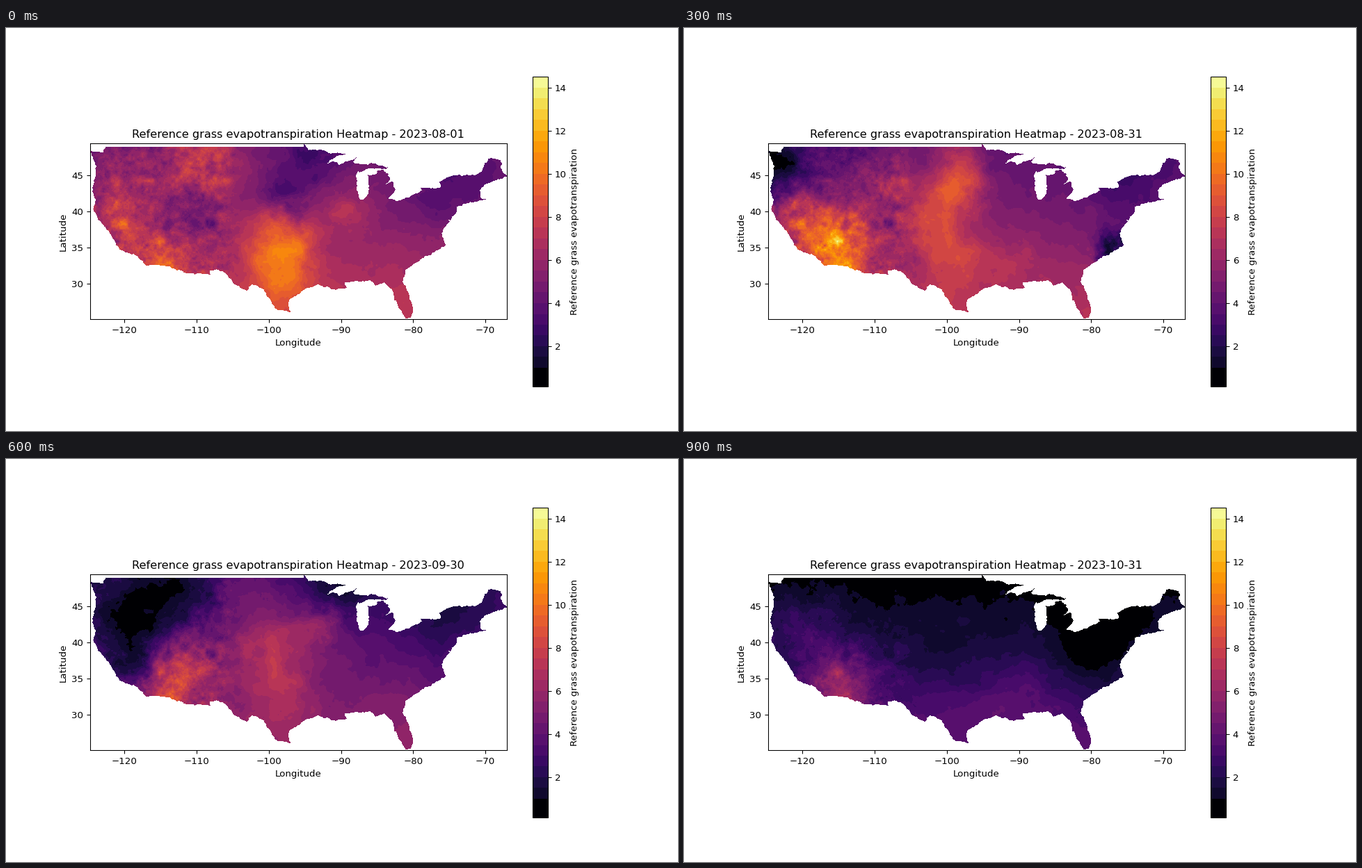
Write a matplotlib script that moves like this. It is 966 px wide and 580 px high and loops after 1 s.

```python
import matplotlib.pyplot as plt
import numpy as np
from matplotlib.animation import FuncAnimation
from matplotlib.colors import ListedColormap
from matplotlib.path import Path

WIDTH, HEIGHT, DPI = 966, 580, 96.6
WEST, EAST, SOUTH, NORTH = -124.7875, -67.0375, 25.046, 49.421
COLS, ROWS = 599, 253
VMIN, VMAX = 0.124, 14.517
STEPS = 10
LABEL = "Reference grass evapotranspiration"

lon, lat = np.meshgrid(np.linspace(WEST, EAST, COLS), np.linspace(NORTH, SOUTH, ROWS))

# Key points (lon, lat) of the outline, clockwise from the north-west corner.
NORTH_SHORE = [
    (-124.7, 48.4), (-123.0, 48.13), (-122.7, 49), (-95.15, 49), (-95.15, 49.4),
    (-94.64, 48.74), (-93, 48.6), (-91.4, 48.1), (-90.8, 48.2), (-89.2, 48),
    (-90.5, 47.7), (-92, 46.72), (-90.75, 46.95), (-90.4, 46.57), (-89, 46.98),
    (-87.8, 47.47), (-88.45, 46.8), (-87.4, 46.5), (-85.2, 46.75), (-83.55, 46.1),
    (-84.2, 45.63), (-83.4, 45.2), (-83.3, 44.3), (-83.9, 43.7), (-82.95, 44.07),
    (-82.45, 43), (-83.45, 41.72), (-82, 41.5), (-80.5, 41.98), (-78.9, 42.85),
    (-79.05, 43.27), (-76.9, 43.28), (-76.2, 43.55), (-76.3, 44.1), (-74.75, 45)]
EAST_COAST = [
    (-71.5, 45), (-70.4, 45.75), (-69.99, 46.7), (-69.23, 47.46), (-67.8, 47.07),
    (-67.78, 45.95), (-66.97, 44.85), (-70, 43.75), (-70.75, 42.9), (-70.5, 41.78),
    (-69.95, 41.7), (-72, 41.2), (-73.9, 40.57), (-74.1, 39.75), (-75.1, 38.6),
    (-75.95, 37), (-75.55, 35.25), (-77.95, 33.87), (-79.3, 33.1), (-81, 31.9),
    (-81.4, 30.3), (-80.1, 27), (-80.15, 25.75), (-80.4, 25.15)]
SOUTH_COAST = [
    (-81.1, 25.13), (-82.75, 27.9), (-82.65, 28.8), (-84.1, 30.1), (-85.2, 29.65),
    (-86, 30.3), (-89.5, 30.15), (-89.3, 29.3), (-90.9, 29.1), (-93.2, 29.77),
    (-94.8, 29.3), (-97.2, 27.7), (-97.15, 25.95), (-99.1, 26.4), (-100.7, 29.1),
    (-102.3, 29.88), (-103.15, 28.98), (-104.5, 29.65), (-106.5, 31.78), (-108.2, 31.78),
    (-108.2, 31.33), (-111.07, 31.33), (-114.8, 32.5), (-117.12, 32.53)]
WEST_COAST = [
    (-118.4, 33.9), (-120.6, 34.5), (-122.5, 37.5), (-123.75, 39), (-124.4, 40.4),
    (-124.1, 41.5), (-124.5, 42.85), (-123.95, 46.2)]
# Inland water as ellipses: (lon, lat, half width, half height).
WATER = [(-87.0, 43.6, 0.87, 2.0), (-86.0, 45.5, 1.0, 0.5),
         (-84.6, 45.85, 1.0, 0.13), (-87.6, 45.1, 0.25, 0.6)]


def value_noise(rng, cell):
    """Random lattice with the given spacing in degrees, smoothly interpolated."""
    x, y = (lon - WEST) / cell, (lat - SOUTH) / cell
    i, j = x.astype(int), y.astype(int)
    lattice = rng.normal(size=(j.max() + 2, i.max() + 2))
    u, v = x - i, y - j
    u, v = u * u * (3 - 2 * u), v * v * (3 - 2 * v)
    low = lattice[j, i] * (1 - u) + lattice[j, i + 1] * u
    high = lattice[j + 1, i] * (1 - u) + lattice[j + 1, i + 1] * u
    return low * (1 - v) + high * v


def fractal(seed, coarsest, octaves=4):
    rng = np.random.default_rng(seed)
    cells = coarsest * 0.5 ** np.arange(octaves)
    total = sum(cell**0.6 * value_noise(rng, cell) for cell in cells)
    return total / total.std()


def land_mask():
    ragged = 0.06 * (lat < 48.7)
    x, y = lon + ragged * fractal(1, 0.5, 2), lat + ragged * fractal(2, 0.5, 2)
    outline = Path(NORTH_SHORE + EAST_COAST + SOUTH_COAST + WEST_COAST)
    land = outline.contains_points(np.column_stack([x.ravel(), y.ravel()]))
    land = land.reshape(lon.shape)
    for cx, cy, rx, ry in WATER:
        land &= np.hypot((x - cx) / rx, (y - cy) / ry) > 1
    return land


warp_x, warp_y = 0.5 * fractal(3, 2.4), 0.5 * fractal(4, 2.4)
terrain = fractal(5, 1.2)
mountains = 1 / (1 + np.exp((lon + 105) / 0.7))


def pulse(x, y, change, radius):
    distance = np.hypot(lon + warp_x - x, lat + warp_y - y)
    return change * np.exp(-((distance / radius) ** 2))


# Lasting pattern: cooler to the north, hot desert and plains, cool north-east.
climate = (-0.14 * (lat - 37.5) + pulse(-114, 33.5, 2.5, 4.5)
           + pulse(-99, 33.5, 2, 5) + pulse(-75, 43, -1.5, 7))


def day_field(step, *pulses):
    """Autumn decline plus the day's warm and cool spells (lon, lat, mm, radius)."""
    season = 5.8 - 3.6 * (step / (STEPS - 1)) ** 2
    field = season + climate + sum(pulse(*p) for p in pulses)
    field = field.clip(0.4) * (1 + 0.08 * mountains * terrain)
    return field + 0.12 * fractal(20 + step, 3)


def banded_inferno(step=0.5):
    values = np.linspace(VMIN, VMAX, 1024)
    middles = np.floor(values / step) * step + step / 2
    middles[values < 1] = VMIN
    return ListedColormap(plt.get_cmap("inferno")((middles - VMIN) / (VMAX - VMIN)))


fields = {
    0: day_field(0, (-109, 48, 3.2, 6), (-119, 44.5, 1.2, 6), (-121, 38, 2.4, 3),
                 (-98, 36.5, 2.8, 4.5), (-98.5, 29, 1.6, 4), (-98, 42.2, -2.3, 3.5),
                 (-94, 48, -1.5, 3), (-89, 40.3, 1.8, 3), (-111, 39, -1.6, 4)),
    2: day_field(2, (-118, 41, -3.3, 6.5), (-120, 48, 2.2, 4), (-112, 48, -1.8, 4),
                 (-99, 49.5, -2.8, 8), (-116, 34.5, -2.6, 5), (-101, 41.5, 5, 4),
                 (-106, 37, 2.5, 4.5), (-98.5, 33, 1.5, 4)),
    3: day_field(3, (-124, 46, -3.5, 4.5), (-116, 37, 4, 4.5), (-122, 38.5, 2.5, 3),
                 (-99.5, 43, 3.8, 3.5), (-102, 38, 2.3, 4), (-98, 47.5, 2.8, 3.5),
                 (-107, 44.5, 2.1, 4), (-91.5, 32.5, 1.2, 3), (-76.8, 35.3, -4.4, 2.2)),
    4: day_field(4, (-119, 46.8, 2, 4), (-114, 38.3, -1.7, 3.5), (-121.5, 38, 1.8, 3),
                 (-102, 44, -2, 5), (-98, 42, -2, 3.5), (-87, 46.5, -2.3, 4),
                 (-81, 37, -2.2, 5)),
    6: day_field(6, (-119, 42.5, -2.8, 6), (-112, 48, -1.6, 5), (-119, 36, -2.4, 3.5),
                 (-111, 37, 2.4, 4.5), (-103, 46.5, 1.7, 5), (-100, 39.5, 3, 4),
                 (-93.5, 42.5, 2.4, 4), (-90, 47, -1.7, 4)),
    8: day_field(8, (-102, 45.5, 2.5, 5.5), (-101, 40, 1.5, 5), (-91.5, 33.5, 2, 4.5),
                 (-111, 41, -0.8, 4), (-121, 38.5, 1.8, 4), (-118, 35, 1.5, 3),
                 (-84, 42.5, -1.4, 3.5)),
    9: day_field(9, (-99, 35, -2, 5.5), (-119.5, 42, 1.1, 5), (-116, 35.5, 1.2, 4),
                 (-91, 32, 0.8, 5), (-81, 37, -1, 5), (-72, 44, 1, 5)),
}
for k in range(STEPS):
    if k not in fields:
        fields[k] = (fields[k - 1] + fields[k + 1]) / 2
land = land_mask()
maps = [np.ma.masked_where(~land, fields[k].clip(VMIN, VMAX)) for k in range(STEPS)]

plt.rcParams["font.family"] = "DejaVu Sans"
# The hundredth of a pixel guards against rounding down.
fig, ax = plt.subplots(figsize=((WIDTH + 0.01) / DPI, (HEIGHT + 0.01) / DPI), dpi=DPI)
image = ax.imshow(maps[0], extent=(WEST, EAST, SOUTH, NORTH), cmap=banded_inferno(),
                  vmin=VMIN, vmax=VMAX, interpolation="nearest")
fig.colorbar(image, ax=ax, label=LABEL)
ax.set(xlabel="Longitude", ylabel="Latitude")
title = ax.set_title("")


def update(k):
    date = np.datetime64("2023-08-01") + 91 * k // (STEPS - 1)
    image.set_data(maps[k])
    title.set_text(f"{LABEL} Heatmap - {date}")
    return image, title


animation = FuncAnimation(fig, update, frames=STEPS, interval=100, repeat=True, repeat_delay=0)
plt.show()
```
